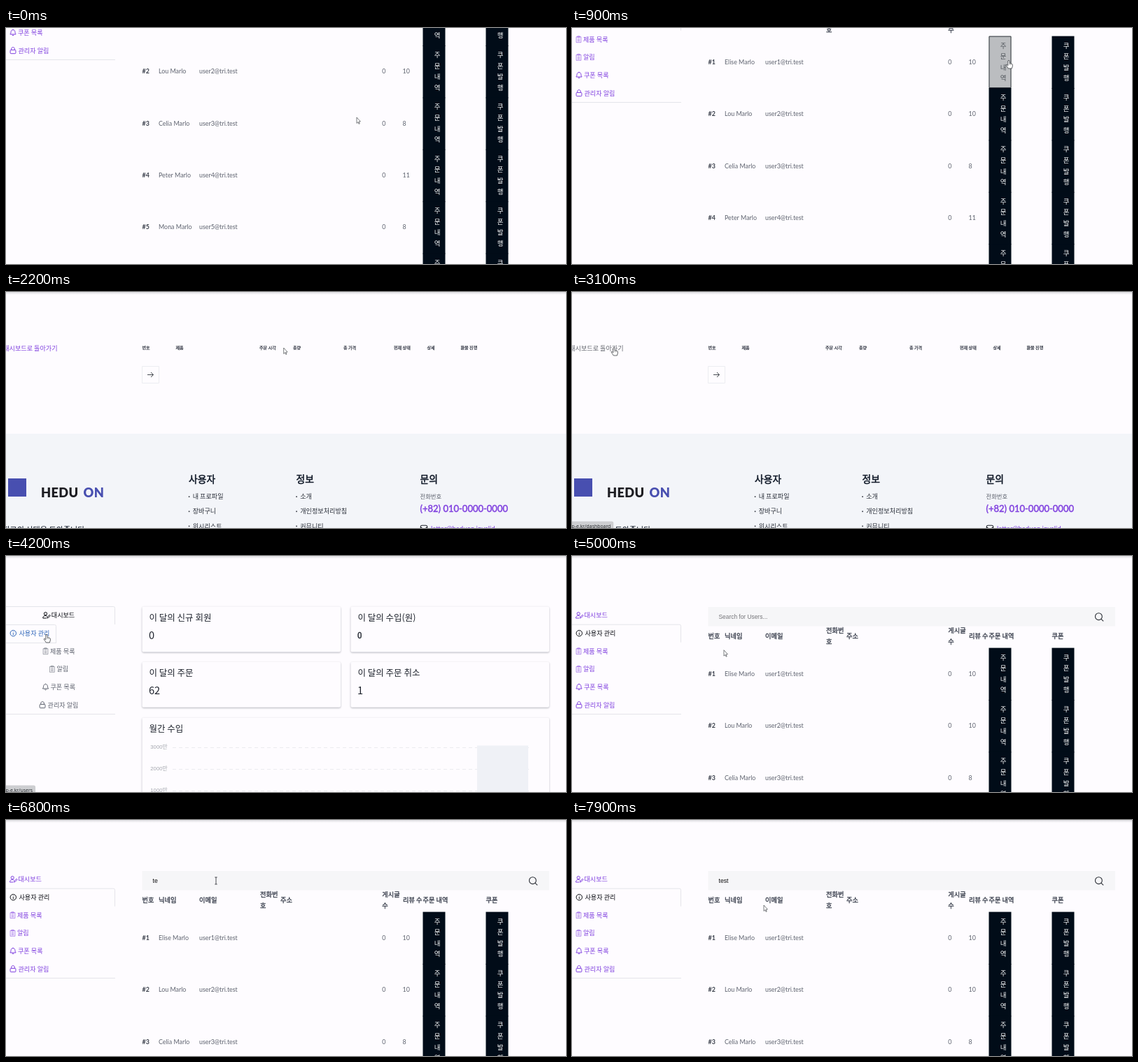
An HTML page with a canvas that plays this animation: 800 px wide and 338 px high, repeating every 8 s.

```html
<!DOCTYPE html>
<html lang="ko">
<head>
<meta charset="utf-8">
<title>Admin dashboard</title>
<style>
html, body { margin: 0; width: 100%; height: 100%; overflow: hidden; background: #fefcff; }
canvas { display: block; width: 800px; height: 338px; }
</style>
</head>
<body>
<canvas id="stage"></canvas>
<script>
const W = 800, H = 338, LOOP = 8000;
const canvas = document.getElementById('stage');
const ctx = canvas.getContext('2d');
const dpr = window.devicePixelRatio || 1;
canvas.width = W * dpr;
canvas.height = H * dpr;

const KR = '"Noto Sans CJK KR", "Noto Sans CJK", sans-serif';
const LATIN = 'Lato, "Noto Sans CJK KR", sans-serif';
const UI = '"Liberation Sans", Arial, sans-serif';
const BG = '#fefcff', PURPLE = '#7f3fdf', INK = '#0c1524', GREY = '#5d626e', LINE = '#e4e5ea', NAVY = '#010c18';

const PAGES = [[0, 'users'], [1200, 'orders'], [3300, 'dashboard'], [4700, 'users']];
const SCROLL = [[0, 181], [350, 120], [1200, 120], [1200, 36], [1600, 36], [1800, 0]];
const POINTER = [
  [0, 501, 128], [200, 501, 128], [850, 624, 47], [1700, 624, 47], [1880, 600, 80],
  [2650, 60, 80], [3350, 60, 80], [3850, 58, 113], [4550, 58, 113], [5500, 402, 160],
  [5850, 402, 160], [6300, 300, 87], [7200, 300, 87], [7650, 274, 122]
];
const STATUS = [[1000, 1950, 'p-e.kr/userorder/1'], [2700, 3350, 'p-e.kr/dashboard'], [3950, 4550, 'p-e.kr/users']];
const KEYS = [6600, 6750, 6900, 7050];
const FOCUS = 6300;

const MENU = [
  ['user', '대시보드', 12], ['info', '사용자 관리', 13], ['clip', '제품 목록', 10.5],
  ['clip', '알림', 10.5], ['bell', '쿠폰 목록', 11.5], ['lock', '관리자 알림', 12]
];
const MEMBERS = [['Elise Marlo', 10], ['Lou Marlo', 10], ['Celia Marlo', 8], ['Peter Marlo', 11], ['Mona Marlo', 8], ['Rita Marlo', 9]];
const ROW = 74.4, ROW_TOP = 131.6;

const ease = p => p * p * (3 - 2 * p);

// Values of a keyed track at time t
function track(keys, t) {
  let i = 0;
  while (i < keys.length - 1 && keys[i + 1][0] <= t) i++;
  const a = keys[i], b = keys[i + 1];
  if (!b) return a.slice(1);
  const p = ease((t - a[0]) / (b[0] - a[0]));
  return a.slice(1).map((v, k) => v + (b[k + 1] - v) * p);
}

// y is the middle of the line; medium weight is regular with a thin outline
function text(s, x, y, size, color, { font = KR, weight = 400, align = 'left' } = {}) {
  const medium = weight === 500;
  ctx.font = `${medium ? 400 : weight} ${size}px ${font}`;
  ctx.textAlign = align;
  ctx.fillStyle = color;
  const base = y + size * 0.37;
  ctx.fillText(s, x, base);
  if (medium) {
    ctx.strokeStyle = color;
    ctx.lineWidth = size * 0.035;
    ctx.lineJoin = 'round';
    ctx.strokeText(s, x, base);
  }
  return ctx.measureText(s).width;
}

function rect(x, y, w, h, fill) {
  ctx.fillStyle = fill;
  ctx.fillRect(x, y, w, h);
}

function stroke(color, width, draw) {
  ctx.strokeStyle = color;
  ctx.lineWidth = width;
  ctx.beginPath();
  draw(ctx);
  ctx.stroke();
}

function line(x1, y1, x2, y2, color, width = 1) {
  stroke(color, width, c => { c.moveTo(x1, y1); c.lineTo(x2, y2); });
}

const ICONS = {
  user(c) {
    c.arc(3.7, -2.4, 2.1, 0, 7);
    c.moveTo(5, 4); c.lineTo(0, 4); c.bezierCurveTo(0, 0, 4, 0, 6, 1.3);
    c.moveTo(6, 4); c.lineTo(6.6, 2.2); c.lineTo(9.6, -0.8); c.lineTo(10.7, 0.3); c.lineTo(7.7, 3.4); c.closePath();
  },
  info(c) {
    c.arc(4.8, 0, 4.2, 0, 7);
    c.moveTo(4.8, -0.4); c.lineTo(4.8, 2.4);
    c.moveTo(4.8, -2.3); c.lineTo(4.8, -1.5);
  },
  clip(c) {
    c.rect(0.6, -3.6, 6.8, 8);
    c.rect(2.4, -4.6, 3.2, 1.8);
    for (const y of [-0.6, 1, 2.6]) { c.moveTo(2.2, y); c.lineTo(5.8, y); }
  },
  bell(c) {
    c.moveTo(0.4, 2.4); c.quadraticCurveTo(1.6, 1, 1.6, -1);
    c.bezierCurveTo(1.6, -5, 7.4, -5, 7.4, -1);
    c.quadraticCurveTo(7.4, 1, 8.6, 2.4); c.closePath();
    c.moveTo(3.2, 3.4); c.quadraticCurveTo(4.5, 5.2, 5.8, 3.4);
    c.moveTo(4.5, -4); c.lineTo(4.5, -4.8);
  },
  lock(c) {
    c.roundRect(0.6, -0.8, 7.8, 5.2, 1);
    c.moveTo(2.2, -0.8); c.lineTo(2.2, -2.4);
    c.bezierCurveTo(2.2, -5.4, 6.8, -5.4, 6.8, -2.4); c.lineTo(6.8, -0.8);
  }
};

function icon(name, x, y, color) {
  ctx.save();
  ctx.translate(x, y);
  stroke(color, name === 'clip' ? 0.55 : 1, ICONS[name]);
  ctx.restore();
}

function tab(y, right) {
  stroke(LINE, 1, c => {
    c.moveTo(-2, y + 0.5); c.lineTo(right - 2.5, y + 0.5);
    c.quadraticCurveTo(right - 0.5, y + 0.5, right - 0.5, y + 2.5);
    c.lineTo(right - 0.5, y + 26);
  });
}

function sidebar(active, hover, centred) {
  line(0, 226.5, 156, 226.5, LINE);
  tab(72 + active * 25.7, 156);
  if (hover) {
    tab(98, 72);
    line(0, 124.5, 72, 124.5, LINE);
  }
  MENU.forEach(([name, label, gap], i) => {
    const y = 85 + i * 25.65;
    let color = PURPLE, x = 5.5;
    if (centred && i !== 1) {
      color = GREY;
      ctx.font = `400 9.1px ${KR}`;
      x = 75.5 - (gap + ctx.measureText(label).width) / 2;
    }
    if (i === active) color = '#080a10';
    else if (i === 1 && hover) color = '#2a62b8';
    icon(name, x, y, color);
    text(label, x + gap, y, 9.1, color);
  });
}

function button(x, y, label, hover) {
  rect(x, y, 32, ROW + 1, hover ? '#bbbdc0' : NAVY);
  if (hover) stroke('#33383f', 1, c => c.rect(x + 0.5, y + 0.5, 31, ROW - 1));
  [...label].forEach((ch, i) =>
    text(ch, x + 20.6, y + 13.5 + i * 15.6, 9.5, hover ? '#4d5258' : '#fff', { align: 'center' }));
}

function search(t) {
  rect(194.5, 73, 581.5, 27.5, '#f6f6f8');
  const typed = 'test'.slice(0, KEYS.filter(k => k <= t).length);
  let w = 0;
  if (typed) w = text(typed, 209.5, 87, 8.7, '#101010', { font: UI });
  else text('Search for Users...', 209.5, 87, 8.4, '#757579', { font: UI });
  if (t >= FOCUS && (t - FOCUS) % 1000 < 500) line(210 + w, 82, 210 + w, 92, '#101010', 0.7);
  stroke('#2b2f36', 1.1, c => {
    c.arc(752.4, 86.7, 4.9, 0, 7);
    c.moveTo(756, 90.3); c.lineTo(759.2, 93.4);
  });
}

function users(t, px, py) {
  sidebar(1, false, false);
  search(t);
  const heads = [
    ['번호', 194.5, 115], ['닉네임', 218, 115], ['이메일', 276, 115], ['전화번', 363, 107], ['호', 363, 123],
    ['주소', 392, 115], ['게시글', 537.3, 107], ['수', 537.3, 123], ['리뷰 수', 567, 115], ['주문 내역', 595.5, 115], ['쿠폰', 685.5, 115]
  ];
  for (const [s, x, y] of heads) text(s, x, y, 9.2, '#343a48', { weight: 500 });
  MEMBERS.forEach(([name, reviews], i) => {
    const top = ROW_TOP + i * ROW, y = top + 37;
    const cell = (s, x, weight = 400) => text(s, x, y, 8.9, weight > 400 ? '#3b404c' : GREY, { font: LATIN, weight });
    cell('#' + (i + 1), 194.5, 700);
    cell(name, 218);
    cell(`user${i + 1}@tri.test`, 276);
    cell('0', 537.3);
    cell(String(reviews), 566.6);
    const over = x => px >= x && px < x + 32 && py >= top && py < top + ROW;
    button(595.5, top, '주문내역', over(595.5));
    button(685.5, top, '쿠폰발행', over(685.5));
  });
}

function footer() {
  rect(0, 203, W, 300, '#f3f5f9');
  rect(3, 267, 26, 26, '#484fb0');
  ctx.letterSpacing = '0.4px';
  const logo = { font: 'Lato, sans-serif', weight: 900 };
  text('HEDU', 50, 287, 18.2, '#1d1d22', logo);
  text('ON', 110.5, 287, 18.2, '#484fb0', logo);
  ctx.letterSpacing = '0px';
  text('최고의 선택을 도와줍니다', 112.5, 341.3, 11.1, INK, { align: 'right' });

  const lists = [
    [261, '사용자', ['내 프로파일', '장바구니', '위시리스트']],
    [414.5, '정보', ['소개', '개인정보처리방침', '커뮤니티']]
  ];
  for (const [x, title, items] of lists) {
    text(title, x, 268, 13.8, INK, { weight: 500 });
    items.forEach((s, i) => {
      const y = 293 + i * 21.1;
      rect(x - 0.2, y - 0.6, 1.6, 1.6, '#30343c');
      text(s, x + 5.7, y, 9.1, '#272c36');
    });
  }
  text('문의', 591.5, 268, 13.8, INK, { weight: 500 });
  text('전화번호', 591.5, 293, 8.3, GREY);
  text('(+82) 010-0000-0000', 591.5, 309.8, 13, PURPLE, { font: LATIN, weight: 500 });
  stroke('#20242c', 1.1, c => {
    c.roundRect(592.3, 334.3, 9.4, 8, 2);
    c.moveTo(592.5, 337); c.lineTo(597, 339.8); c.lineTo(601.5, 337);
  });
  text('letter@heduon.invalid', 607, 338.5, 9.6, PURPLE, { font: LATIN });
  stroke('#20242c', 1.1, c => {
    c.moveTo(597, 366);
    c.bezierCurveTo(588, 359, 592, 355.3, 597, 355.3);
    c.bezierCurveTo(602, 355.3, 606, 359, 597, 366);
    c.moveTo(598.6, 359.7); c.arc(597, 359.7, 1.6, 0, 7);
  });
  text('별솔대로', 607, 359.5, 9.6, PURPLE);
  text('서울, 대한민국', 607, 371.8, 9.6, PURPLE);
}

function orders(hover) {
  text('대시보드로 돌아가기', 73.5, 80.2, 9.1, hover ? '#62656d' : PURPLE, { align: 'right' });
  const heads = [
    ['번호', 194.5], ['제품', 242.5], ['주문 시각', 362], ['총량', 410],
    ['총 가격', 482], ['현재 상태', 554], ['상세', 601.5], ['환불 진행', 649.5]
  ];
  for (const [s, x] of heads) text(s, x, 80.2, 6.1, '#262b38', { weight: 500 });
  stroke('#ecedf1', 1, c => c.rect(194.5, 106.5, 24, 24));
  stroke('#33373f', 0.9, c => {
    c.moveTo(202, 118.5); c.lineTo(210.5, 118.5);
    c.moveTo(207, 115); c.lineTo(210.5, 118.5); c.lineTo(207, 122);
  });
  footer();
}

function card(x, y, w, h, title) {
  ctx.save();
  ctx.shadowColor = 'rgba(20, 25, 40, 0.32)';
  ctx.shadowBlur = 2.5 * dpr;
  ctx.shadowOffsetY = 1 * dpr;
  ctx.fillStyle = BG;
  ctx.beginPath();
  ctx.roundRect(x, y, w, h, 2);
  ctx.fill();
  ctx.restore();
  text(title, x + 10, y + 15.8, 12.5, '#1d222c');
}

function dashboard(t, hover) {
  sidebar(0, hover, true);
  const cards = [
    [194.5, 72.5, '이 달의 신규 회원', '0'], [492.5, 72.5, '이 달의 수입(원)', '0'],
    [194.5, 151.8, '이 달의 주문', '62'], [492.5, 151.8, '이 달의 주문 취소', '1']
  ];
  cards.forEach(([x, y, title, value], i) => {
    card(x, y, 283.5, 65, title);
    text(value, x + 9.5, y + 41.2, i === 1 ? 11.6 : 14.6, '#1d222c', { weight: i === 1 ? 500 : 400 });
  });
  card(194.5, 231.5, 581.5, 200, '월간 수입');
  ctx.setLineDash([5, 4]);
  [3000, 2000, 1000].forEach((n, i) => {
    const y = 274.5 + i * 31;
    text(n + '만', 230.5, y - 1.3, 7.7, '#a4a7ae', { font: `"Liberation Sans", ${KR}`, align: 'right' });
    line(238, y, 749, y, '#e6e7eb', 0.8);
  });
  ctx.setLineDash([]);
  const p = Math.max(0, Math.min(1, (t - 3500) / 600));
  const top = 367.5 - 96 * (1 - (1 - p) ** 3);
  rect(673, top, 73, 367.5 - top, '#eff1f6');
}

function polygon(points, fill, edge, width) {
  ctx.beginPath();
  points.forEach(([x, y]) => ctx.lineTo(x, y));
  ctx.closePath();
  ctx.fillStyle = fill;
  ctx.fill();
  ctx.strokeStyle = edge;
  ctx.lineWidth = width;
  ctx.lineJoin = 'round';
  ctx.stroke();
}

function pointer(x, y, kind) {
  const edge = '#24272d';
  ctx.save();
  ctx.translate(x, y);
  if (kind === 'hand') {
    polygon([[-1.2, 0], [0, -0.7], [1, 0], [1, 3.6], [2.4, 3.7], [4, 4.3], [5.3, 5.2], [5.3, 8], [4.3, 11],
      [-0.7, 11], [-2.4, 8.4], [-4, 6], [-3.2, 5.2], [-1.2, 6.8]], '#fff', edge, 0.7);
    line(1, 4, 1, 6, edge, 0.4);
    line(2.8, 4.5, 2.8, 6.2, edge, 0.4);
  } else if (kind === 'beam') {
    line(0, -5, 0, 5, edge, 0.8);
    line(-1.7, -5, 1.7, -5, edge, 0.8);
    line(-1.7, 5, 1.7, 5, edge, 0.8);
  } else {
    polygon([[0, 0], [0, 8.4], [1.9, 6.8], [3.2, 9.5], [4.2, 9], [3, 6.3], [5.4, 6]], '#fff', edge, 0.6);
  }
  ctx.restore();
}

function status(label) {
  const font = '"Open Sans", sans-serif';
  ctx.font = `400 6.9px ${font}`;
  const right = Math.min(62.5, ctx.measureText(label).width + 3.5);
  ctx.fillStyle = '#cdced1';
  ctx.beginPath();
  ctx.roundRect(-3, 328.5, right + 3, 14, 2.5);
  ctx.fill();
  text(label, right - 4, 335.6, 6.9, '#1f2226', { font, align: 'right' });
}

function draw(t) {
  const page = PAGES.filter(p => p[0] <= t).pop()[1];
  const [scroll] = track(SCROLL, t);
  const [x, y] = track(POINTER, t);
  const py = y + scroll;
  const onBack = page === 'orders' && x < 74 && py > 73 && py < 88;
  const onTab = page === 'dashboard' && x < 72 && py > 98 && py < 124;

  ctx.setTransform(dpr, 0, 0, dpr, 0, 0);
  rect(0, 0, W, H, BG);
  ctx.save();
  ctx.translate(0, -scroll);
  const shade = ctx.createLinearGradient(0, 0, 0, 4);
  shade.addColorStop(0, '#dcdce0');
  shade.addColorStop(1, BG);
  rect(0, 0, W, 4, shade);
  if (page === 'users') users(t, x, py);
  else if (page === 'orders') orders(onBack);
  else dashboard(t, onTab);
  ctx.restore();

  const tip = STATUS.find(s => t >= s[0] && t < s[1]);
  if (tip) status(tip[2]);

  let kind = 'arrow';
  if (onBack || onTab) kind = 'hand';
  if (page === 'users') {
    if (py > ROW_TOP && ((x >= 595.5 && x < 627.5) || (x >= 685.5 && x < 717.5))) kind = 'hand';
    if (x < 72 && py > 72 && py < 226) kind = 'hand';
    if (x > 194 && x < 740 && py > 73 && py < 100) kind = 'beam';
  }
  pointer(x, y, kind);
}

function frame(now) {
  draw(now % LOOP);
  requestAnimationFrame(frame);
}
draw(0);
requestAnimationFrame(frame);
</script>
</body>
</html>
```
